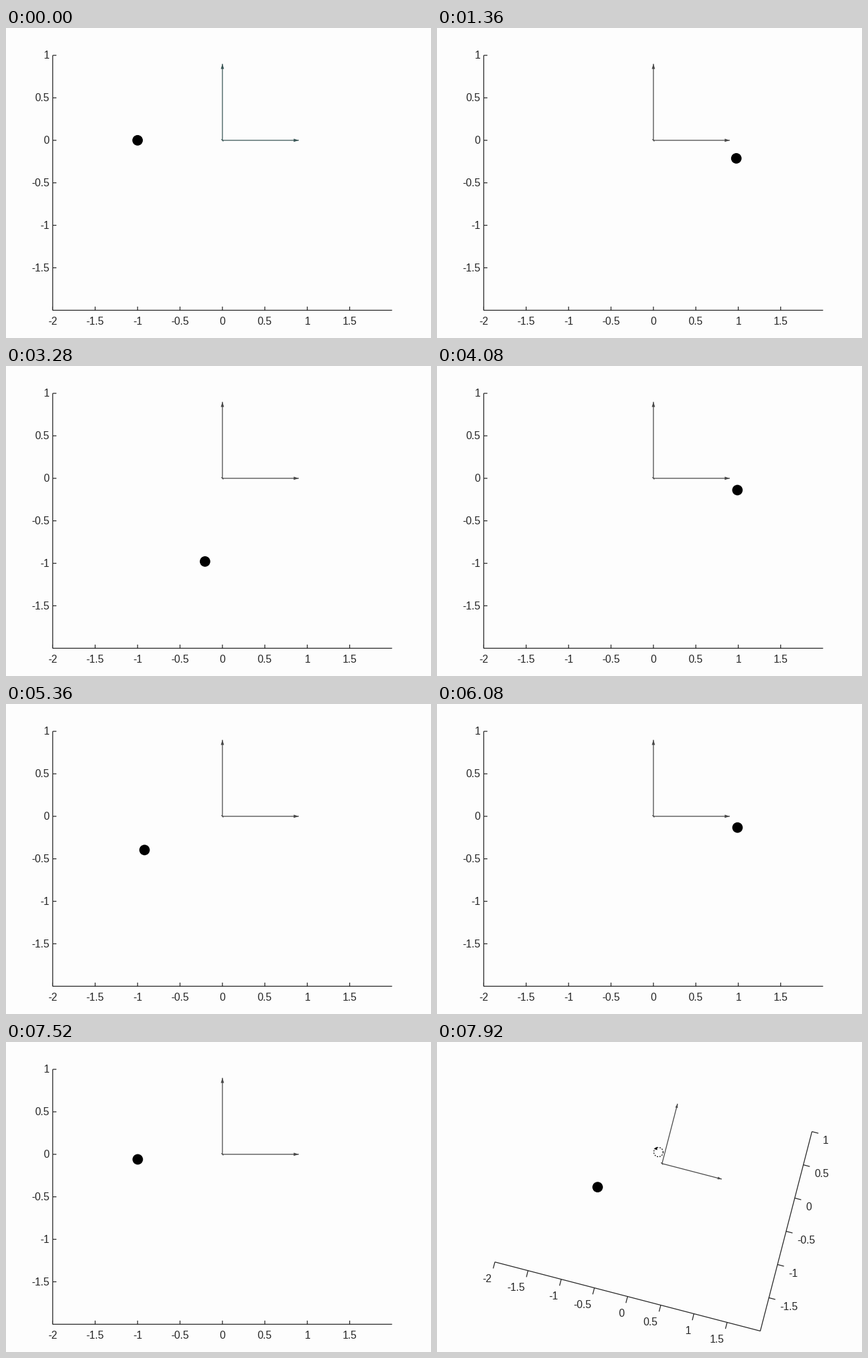
Write a matplotlib script that moves like this. It is 640 by 466 pixels and loops after 8 s.

```python
import numpy as np
import matplotlib.pyplot as plt
from matplotlib.animation import FuncAnimation

W, H, DPI = 640, 466, 100
FRAMES, STEP = 100, 80
PX = 72 / DPI
CENTER = np.array([325.4, 232.2])   # stage position of data point (0, -0.5)
UNIT = 127.75                       # pixels per data unit in the flat view
INK, BACK = "#262626", "#fdfdfd"
X_TICKS = np.arange(-4, 4) / 2
Y_TICKS = np.arange(-3, 3) / 2
TURN_START, TURN_END, TURN = 7760, 7920, 14.55

# Times of the turning points, counted in half swings
SWING_MS = [385, 1569, 2738, 3915, 5075, 6826, 7411, 8581]
SWING_NO = [0, 1, 2, 3, 4, 5.5, 6, 7]


def swing_table(n=8000):
    """Angle of an ideal pendulum over one period, released at 90 degrees."""
    dt = 4 * 1.8540747 / n
    angle, speed = -np.pi / 2, 0.0
    table = [angle]
    speed -= 0.5 * dt * np.sin(angle)
    for _ in range(n):
        angle += speed * dt
        speed -= np.sin(angle) * dt
        table.append(angle)
    return np.array(table)


TABLE = swing_table()
PHASES = np.linspace(0, 2, len(TABLE))


def ball_pos(t):
    # The swing is held while the view is being turned
    phase = np.interp(min(t, TURN_START), SWING_MS, SWING_NO) % 2
    angle = np.interp(phase, PHASES, TABLE)
    return np.sin(angle), -np.cos(angle)


class View:
    """Maps data coordinates to stage pixels for a view turned clockwise."""

    def __init__(self, degrees):
        a = np.radians(degrees)
        c, s = np.cos(a), np.sin(a)
        grow = (4 * c + 3 * s) / 4 * (4 * s + 3 * c) / 3
        self.scale = UNIT / grow ** 0.52
        self.ux = np.array([c, s])
        self.uy = np.array([s, -c])

    def __call__(self, x, y):
        return CENTER + self.scale * (x * self.ux + (y + 0.5) * self.uy)


fig = plt.figure(figsize=(W / DPI, H / DPI), dpi=DPI, facecolor=BACK)
ax = fig.add_axes([0, 0, 1, 1])


def line(*pts, color=INK, width=1.25):
    xs, ys = zip(*pts)
    ax.plot(xs, ys, color=color, lw=width * PX, snap=False,
            solid_capstyle="butt", solid_joinstyle="miter")


def label(pos, value, ha):
    ax.text(pos[0], pos[1] + 5.4, f"{value:g}", ha=ha, va="baseline",
            color=INK, family="Liberation Sans", fontsize=15.8 * PX)


def flat_axes(view):
    line(view(-2, 1), view(-2, -2), view(2, -2))
    for x in X_TICKS:
        p = view(x, -2)
        line(p, p - (0, 5.5))
        label(p + (0, 16), x, "center")
    for y in Y_TICKS:
        p = view(-2, y)
        line(p, p + (5.5, 0))
        label(p + (-5, 0), y, "right")


def turned_axes(view):
    line(view(-2, -2), view(2, -2), view(2, 1))
    for x in X_TICKS:
        p = view(x, -2)
        line(p, p - 10 * view.uy)
        label(p + (-4.5, 25), x, "right")
    for y in Y_TICKS:
        p = view(2, y)
        line(p, p + 10 * view.ux)
        label(p + (16.5, 13), y, "left")


def arrows(view, color):
    origin = view(0, 0)
    for along, side in ((view.ux, view.uy), (view.uy, view.ux)):
        tip = origin + 0.9 * view.scale * along
        back = tip - 0.06 * view.scale * along
        wing = 0.019 * view.scale * side
        line(origin, tip, color=color)
        head = np.array([back + wing, tip, back - wing])
        ax.fill(*head.T, color=color, lw=0, snap=False)
    line(origin - (1.5, 1.5), origin + (1.5, 1.5), color=color)


def turn_cursor(x, y):
    a = np.linspace(0, 2 * np.pi, 60)
    ax.plot(x + 7 * np.cos(a), y + 7 * np.sin(a), color="black",
            lw=1.2 * PX, dashes=(1.6, 1.6), dash_capstyle="butt")
    ax.fill([x - 7, x - 2, x - 2], [y - 5, y - 8, y - 3], color="black", lw=0)


def draw(i):
    t = i * STEP
    ax.clear()
    ax.set_axis_off()
    ax.set_xlim(-0.5, W - 0.5)
    ax.set_ylim(H - 0.5, -0.5)

    turn = max(0, (t - TURN_START) / (TURN_END - TURN_START))
    view = View(TURN * turn ** 2)
    if turn:
        turned_axes(view)
    else:
        flat_axes(view)
    arrows(view, "#3a5656" if t < 480 else "#484848")
    x, y = view(*ball_pos(t))
    ax.add_patch(plt.Circle((x, y), 7.9, color="black", lw=0))
    if turn:
        turn_cursor(333 + 50 * (1 - turn), 165)
    return []


anim = FuncAnimation(fig, draw, frames=FRAMES, interval=STEP,
                     init_func=lambda: draw(0), repeat=True, repeat_delay=0)
plt.show()
```
